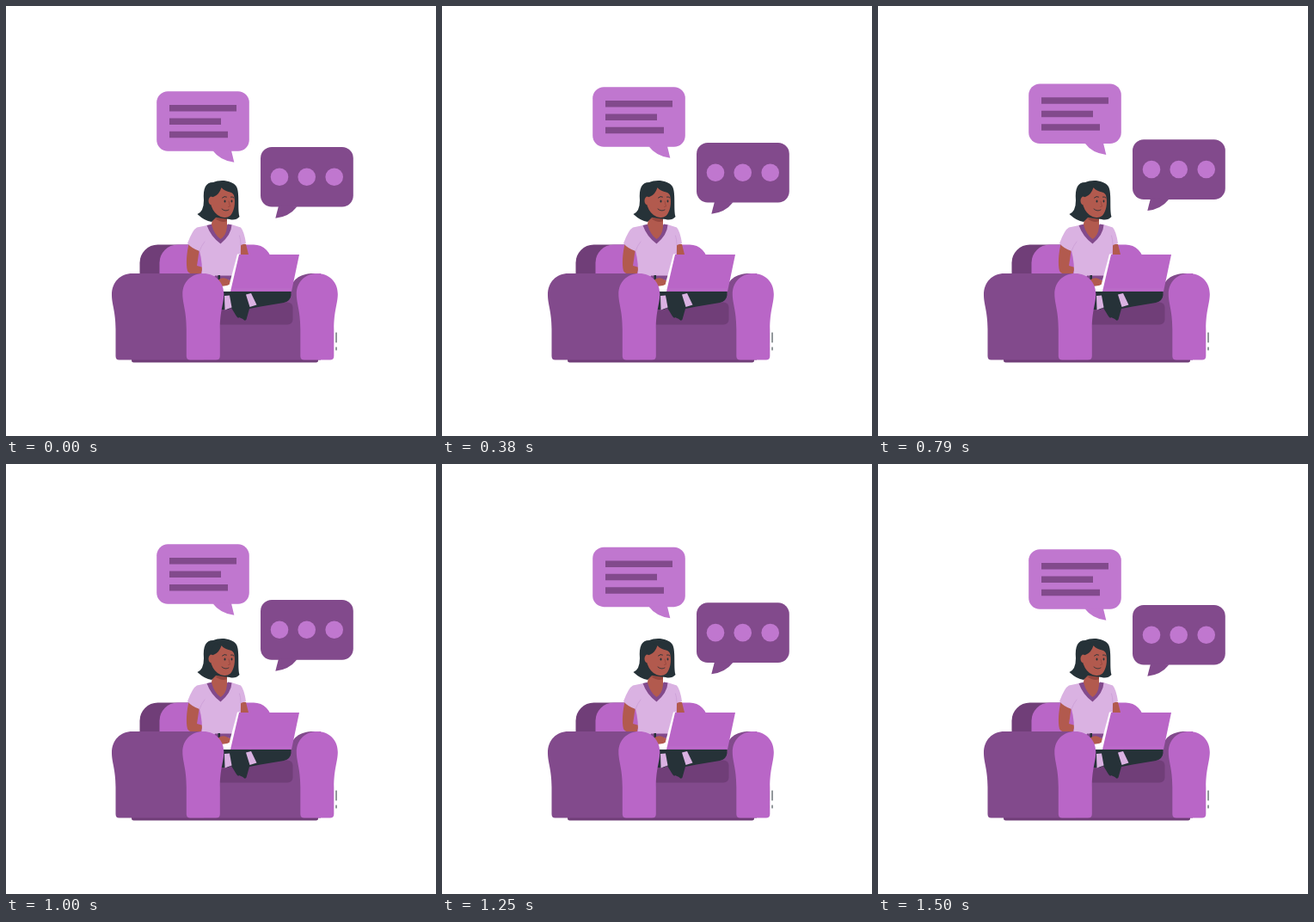
An HTML page with a canvas for the animation above (1.54 s loop, 500 by 500 pixels).

```html
<!DOCTYPE html>
<html lang="en">
<head>
<meta charset="utf-8">
<title>Chatting on the sofa</title>
<style>
html, body { margin: 0; width: 100%; height: 100%; overflow: hidden; background: #fff; }
canvas { display: block; width: 500px; height: 500px; }
</style>
</head>
<body>
<canvas id="stage" width="500" height="500"></canvas>
<script>
const ctx = document.getElementById('stage').getContext('2d');
const LOOP = 1540, FPS = 24;
const C = {
  light: '#b966c7', bubble: '#c077cf', dark: '#824a8c', deep: '#703e78',
  shirt: '#dab2e2', fold: '#c99bd4', skin: '#b25a4e', shade: '#96463e',
  ink: '#263238', white: '#fff'
};

function fill(path, color) {
  ctx.fillStyle = color;
  ctx.fill(new Path2D(path));
}

function line(path, color, width) {
  ctx.strokeStyle = color;
  ctx.lineWidth = width;
  ctx.lineCap = 'round';
  ctx.stroke(new Path2D(path));
}

function box(x, y, w, h, r, color) {
  ctx.fillStyle = color;
  ctx.beginPath();
  ctx.roundRect(x, y, w, h, r);
  ctx.fill();
}

function dot(x, y, r, color, ry = r) {
  ctx.fillStyle = color;
  ctx.beginPath();
  ctx.ellipse(x, y, r, ry, 0, 0, Math.PI * 2);
  ctx.fill();
}

// Bell-shaped front of an armrest, 48 px wide
function armFront(x) {
  ctx.save();
  ctx.translate(x, 0);
  fill('M0 335C0 321 10 311 24 311S48 321 48 335C48 346 43.5 354 43.5 376V407Q43.5 411.5 39 411.5H9Q4.500 411.5 4.500 407V376C4.500 354 0 346 0 335Z', C.light);
  ctx.restore();
}

function sofaBack() {
  box(146, 409, 217, 5.5, 2.5, C.deep);
  box(155.500, 277.500, 70, 60, [21, 0, 0, 0], C.deep);
  box(178.500, 277.500, 130.5, 60, [21, 21, 0, 0], C.light);
  fill('M246 332H331C331 319 341 311 358 311H366V411.500H246Z', C.dark);
  box(236, 344.500, 97.500, 26, 6, C.deep);
}

function sofaFront() {
  fill('M147 311H230V411.500H131.500Q127.500 411.500 127.500 407V376C127.500 355 123 347 123 336C123 321 133 311 147 311Z', C.dark);
  armFront(205.300);
  armFront(337.800);
  line('M384 380V391M384 397V400', C.ink, 1);
}

function legs() {
  fill('M248 330H331.500V336Q331 343 323 345L296 349.500L283 352L279.500 364.500Q278 367 275.500 364L271 362Q270 364 267.500 360L262 351L258 353H248Z', C.ink);
  fill('M254 337L260 336.500L262.500 350.500L254.500 353.500Z', C.shirt);
  fill('M279 335.500L285 334L291.500 347.500L283.500 350Z', C.shirt);
}

function body() {
  fill('M213 275C210 286 209 300 211 308Q213 312 220 312L226 313L229 304L222 302L225 282Z', C.skin);
  fill('M273 276L279 277L282.500 291H273Z', C.skin);
  fill('M234 255L222 257.500Q217 260 211 276Q216 282 225 285Q229 300 227.500 314H272L273 278L279 276Q277 262 273 257.500L262 254Z', C.shirt);
  line('M231 274Q227 279 225 285M273 278Q273 271 271.500 267', C.fold, .7);
  fill('M233.500 255L240 253.500L249 268L258 253.500L262.500 254.500Q262 266 249.500 276.500Q238 268 233.500 255Z', C.dark);
  fill('M240.500 243L257 245V257Q256 267 249.500 271Q242 266 239 254Z', C.skin);
  fill('M243 247Q251 253 257 250V246Z', C.shade);
}

function head() {
  fill('M241 205C248 201.500 263 202 268 210C272 217 269 236 271.500 245Q267 250 260 248L244 246L239 251Q231 250 222.500 242Q230 239 230 226C229 212 232 205 241 205Z', C.ink);
  dot(239, 226.500, 3.500, C.skin, 5);
  fill('M241 222C247 220 249 215 250.500 211C255 217 263 215 265 220C267.500 229 265 240 260.500 244Q256 247.500 249.500 245Q242 242 238.500 232Z', C.skin);
  fill('M250.500 211Q245 219 240 222L237 220L243 208Z', C.ink);
  dot(254.500, 227, 1, C.ink, 1.500);
  dot(262.500, 227, .9, C.ink, 1.400);
  line('M251.500 223Q254 220.500 256.500 222M261.500 222Q263.500 221.500 265 223', C.ink, .9);
  line('M259 227L260.500 233L258.500 233.500', C.shade, .8);
  line('M251 236Q255 239.500 259 237', C.ink, .8);
}

function laptop() {
  box(243, 313.500, 22, 5, 0, C.dark);
  fill('M246.500 313H249V320H246.500Z', C.ink);
  fill('M248 325L264 323L264 332H252Z', C.white);
  fill('M246 319Q251 315 256 317L262 320Q261 324 257 325L250 326L246 325Z', C.skin);
  fill('M269 288.500H272L263 332H257.500Z', C.white);
  fill('M271 289H341L332 332H261Z', C.light);
  line('M263 329.300H331', C.bubble, .7);
}

function bubbles() {
  box(175.200, 99, 107.600, 69.500, 13, C.bubble);
  fill('M240.500 168Q249 179.500 265.300 181.500L261.800 167Z', C.bubble);
  [78, 60, 68].forEach((w, i) => box(190, 114.800 + i * 15.400, w, 7.500, 0, C.dark));

  box(296, 163.700, 107.800, 69.700, 13, C.dark);
  fill('M317 232L313.300 246.500Q329 245 338.500 233Z', C.dark);
  [318, 349.700, 381.700].forEach(x => dot(x, 198.500, 10.300, C.bubble));
}

// Linear float: 10 px up and back every 1.5 s
function floatY(seconds) {
  const phase = (seconds + .029) / 1.5 % 1;
  return .6 - 10 * (1 - Math.abs(2 * phase - 1));
}

function draw(now) {
  const step = Math.floor((now % LOOP + 2) * FPS / 1000);
  ctx.fillStyle = C.white;
  ctx.fillRect(0, 0, 500, 500);
  sofaBack();
  legs();
  body();
  head();
  laptop();
  sofaFront();
  ctx.save();
  ctx.translate(0, floatY(step / FPS));
  bubbles();
  ctx.restore();
}

function tick() {
  draw(performance.now());
  requestAnimationFrame(tick);
}
tick();
</script>
</body>
</html>
```
